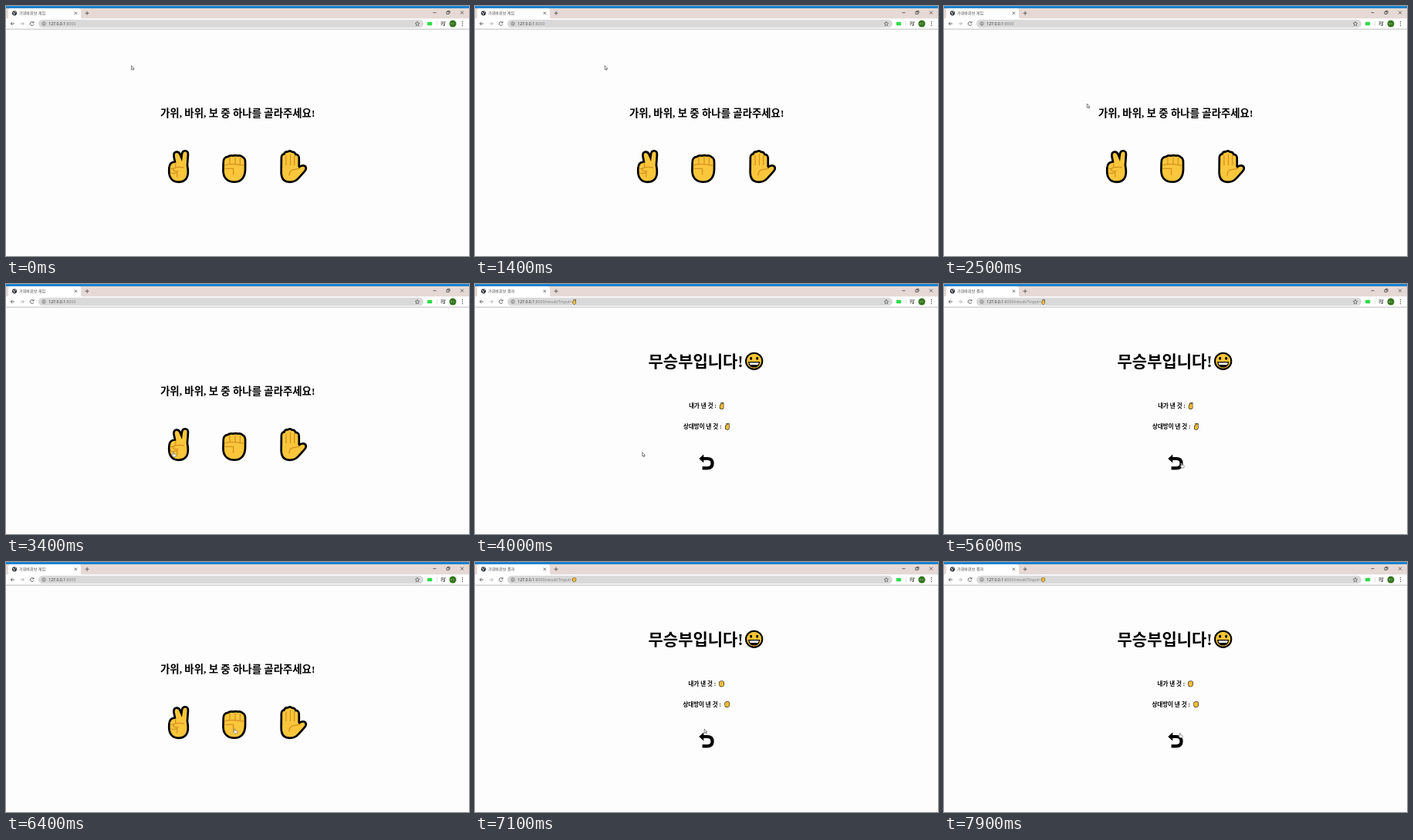
An HTML page for the animation above (8 s loop, 600x325 px).

```html
<!DOCTYPE html>
<html lang="ko">
<head>
<meta charset="utf-8">
<title>가위바위보 게임</title>
<style>
  html, body { margin: 0; width: 100%; height: 100%; overflow: hidden; background: #fefdfe; }
  svg { display: block; width: 600px; height: 325px; }
  .ui { font: 5.1px "Noto Sans CJK KR", "Noto Sans CJK", sans-serif; fill: #4a4646; }
  .url { font: 5.2px "Open Sans", sans-serif; fill: #7b7b7b; }
  .page { font-family: "Liberation Serif", "Noto Sans CJK KR", "Noto Sans CJK", serif; font-weight: bold; fill: #000; }
  .line { fill: none; stroke: #555; stroke-width: .9; }
  .skin { fill: #f9c63c; stroke: #000; stroke-width: 5.4; stroke-linejoin: round; paint-order: stroke; }
  .crease { fill: none; stroke: #d6921f; stroke-width: 1.3; stroke-linecap: round; stroke-linejoin: round; }
</style>
</head>
<body>
<svg viewBox="0 0 600 325">
  <defs>
    <!-- Hands are centred on 0,0 so they can be reused at any size -->
    <g id="scissors" transform="translate(-223.5 -208.5)">
      <path class="skin" d="M220.5 203.5 218.8 195Q218.5 191.3 221 191 223.3 190.8 224.4 193.5L228 202 229.3 192.5Q229.8 189.6 232.3 189.6 234.8 190 234.6 193L233.6 207Q234.6 212 234.5 216C234.5 224 230 227.5 223.5 227.5 216 227.5 212.6 222 212.6 215Q212.2 206 216 204.6Z"/>
      <path class="crease" d="M219.7 205V209.5M214 211.5H217M230 210Q224 208.7 219 210.2 215.5 212 217.5 214 219 215.5 223 214.6M214 217Q217 218.5 221.8 216.4V222"/>
    </g>
    <g id="rock" transform="translate(-296 -211.5)">
      <path class="skin" d="M283 204Q282.6 197.5 288 197.3 290.5 195 294 196 297.5 194.8 301 196 304 195.3 306 197.5 309 198.5 308.7 204V212C308.7 222 304 227.4 296 227.4 287 227.4 282.8 222 282.8 214Z"/>
      <path class="crease" d="M290 197.5V205.5M297 197V205.5M303.4 197.5V205.5M283.3 207Q288 205.3 296 205.6L308 207.2M284 211.3H294.6V219"/>
    </g>
    <g id="paper" transform="translate(-372.5 -208.5)">
      <path class="skin" d="M358.2 197Q358.3 193.5 361.5 193.8 362 190.4 365.5 190.8 368 188.8 370 191 373.8 190.7 374.3 194.3 378.2 194 378.4 197.6V209L380 211Q384.2 207.5 387 209.5 388.2 211.5 386 214L378 223Q374 227.5 368 227.5C361 227.5 358 223 358 216Z"/>
      <path class="crease" d="M363 195V206.5M368.5 193V206.5M373.6 195V206.5M367 220Q367 213.5 373 212.6L380 211.4"/>
    </g>
  </defs>

  <rect width="600" height="325" fill="#fefdfe"/>
  <g id="browser">
    <rect width="600" height="16.5" fill="#e6d9d5"/>
    <rect width="600" height="3" fill="#1c82cf"/>
    <path d="M0 16.5Q3 16.5 3 14V5.5Q3 3 5.5 3H94.5Q97 3 97 5.5V14Q97 16.5 100 16.5H600V30H0Z" fill="#fff"/>
    <rect y="29.6" width="600" height="1" fill="#bdbdbd"/>
    <circle cx="11" cy="9.3" r="3.1" fill="#33363a"/>
    <path d="M9 8.2 11 9.4 10.3 11.4M11.5 7 13 8.4" fill="none" stroke="#fff" stroke-width=".9"/>
    <text id="tab" class="ui" x="17" y="11.2"></text>
    <path class="line" d="M88.7 7.6l3.4 3.4m0-3.4-3.4 3.4M102.6 9.3h5m-2.5-2.5v5M553.5 8.7h4M571 7.5h3v3h-3zM572.2 7.4V6.4h2.9v2.9h-1M589 6.6l4 4m0-4-4 4"/>
    <path class="line" d="M11 23H6.2m2.2-2.2L6.2 23l2.2 2.2"/>
    <path class="line" stroke-opacity=".45" d="M18.5 23h4.8m-2.2-2.2 2.2 2.2-2.2 2.2"/>
    <path class="line" d="M35.5 21.4a2.4 2.4 0 1 0 .4 2.4M36 20.2v1.7h-1.8"/>
    <rect x="42" y="17.8" width="499" height="10.4" rx="5.2" fill="#d9d9d9"/>
    <circle cx="49" cy="23" r="2.3" fill="none" stroke="#666" stroke-width=".7"/>
    <path class="line" d="M49 22.7v1.6m0-2.7v.6" stroke-width=".7"/>
    <text class="url" x="55.2" y="25"><tspan fill="#2b2b2b">127.0.0.1</tspan><tspan id="path"></tspan></text>
    <use id="urlHand"/>
    <path class="line" style="stroke-width:.7" d="M533 20.2l.8 1.9 2 .2-1.5 1.4.4 2-1.7-1-1.7 1 .4-2-1.5-1.4 2-.2z"/>
    <rect x="546" y="20.8" width="6.2" height="4.4" rx=".8" fill="#2fdc49"/>
    <path d="M558.5 19.5v7" stroke="#ccc" stroke-width=".6"/>
    <path class="line" d="M563.5 20.8h4M563.5 22.6h4M563.5 24.4h2M568.3 25v-4.2h1.5"/>
    <circle cx="567.5" cy="25" r="1" fill="#555"/>
    <circle cx="579" cy="23" r="4.5" fill="#32731d"/>
    <path d="M576.4 22.2h1.5v1.6h-1.5zM579.2 22.2h1.8m-1.8 1.5h1.8" fill="none" stroke="#8db87c" stroke-width=".6"/>
    <g fill="#555"><circle cx="591.5" cy="20.6" r=".75"/><circle cx="591.5" cy="23" r=".75"/><circle cx="591.5" cy="25.4" r=".75"/></g>
  </g>

  <g id="game" class="page">
    <text x="200" y="143.6" font-size="13.4">가위, 바위, 보 중 하나를 골라주세요!</text>
    <use href="#scissors" x="223.5" y="208.5"/>
    <use href="#rock" x="296" y="211.5"/>
    <use href="#paper" x="372.5" y="208.5"/>
  </g>

  <g id="result" class="page">
    <text x="224.5" y="107.6" font-size="21">무승부입니다!</text>
    <circle cx="361.7" cy="100.3" r="10.6" fill="#fbc437" stroke="#000" stroke-width="2.1"/>
    <ellipse cx="357.7" cy="96.8" rx="1.5" ry="2"/>
    <ellipse cx="365.7" cy="96.8" rx="1.5" ry="2"/>
    <path d="M354.8 101.6H368.6Q367.8 108 361.7 108 355.6 108 354.8 101.6Z" fill="#fff" stroke="#000" stroke-width="1.2"/>
    <path d="M356 105H367.4Q365.5 108 361.7 108 357.9 108 356 105Z"/>
    <g font-size="7.5">
      <text id="mine" y="161">내가 낸 것 :</text>
      <text id="theirs" y="187.8">상대방이 낸 것 :</text>
    </g>
    <use id="mineHand"/>
    <use id="theirsHand"/>
    <path d="M290.3 227 296.3 221.6V232.4Z"/>
    <path d="M295.5 227H301Q307.6 227 307.6 233.2 307.6 239.4 301 239.4H294.6" fill="none" stroke="#000" stroke-width="4.2"/>
  </g>

  <g id="cursor" stroke-linejoin="round">
    <path id="pointer" d="M0 0V5.2L1.2 4.2 2.1 6 2.9 5.6 2.1 3.9H3.7Z" fill="#fff" stroke="#444" stroke-width=".65"/>
    <path id="hand" d="M-.6.4Q0-.4.6.4V2.4L2.9 2.9Q3.7 3.2 3.5 4.2L3 6.3H.2L-1.7 3.9Q-1.6 3-.6 3.8Z" fill="#fff" stroke="#555" stroke-width=".55"/>
  </g>
</svg>
<script>
const LOOP = 8000, STEP = 100;
const $ = id => document.getElementById(id);

// Pages by start time; hand names the choice shown on a result page
const pages = [
  { at: 0 },
  { at: 3700, hand: 'scissors' },
  { at: 5900 },
  { at: 6800, hand: 'rock' }
];

// Pointer tip: time, x, y
const track = [
  [0, 162.5, 77.5], [900, 162.5, 77.5], [1400, 168.2, 77.5], [2100, 168.2, 77.5],
  [3100, 216.8, 218.3], [3700, 216.8, 218.8], [4400, 216.8, 218.8], [5300, 307.8, 232.8],
  [5950, 307.8, 232.8], [6300, 296.2, 216.6], [7000, 296.2, 216.6], [7500, 305.8, 222.3], [LOOP, 305.8, 222.3]
];

const ease = p => p * p * (3 - 2 * p);
const show = (id, on) => $(id).style.display = on ? '' : 'none';

function pointerAt(t) {
  const i = track.findIndex((k, n) => n && t < k[0]);
  const [t0, x0, y0] = track[i - 1], [t1, x1, y1] = track[i];
  const p = ease((t - t0) / (t1 - t0));
  return [x0 + (x1 - x0) * p, y0 + (y1 - y0) * p];
}

function place(id, hand, x, y, size) {
  $(id).setAttribute('href', '#' + hand);
  $(id).setAttribute('transform', `translate(${x} ${y}) scale(${size})`);
}

function openPage({ hand }) {
  show('game', !hand);
  show('result', hand);
  show('urlHand', hand);
  $('tab').textContent = hand ? '가위바위보 결과' : '가위바위보 게임';
  $('path').textContent = hand ? ':8000/result/?input=' : ':8000';
  if (!hand) return;
  const shift = hand === 'rock' ? -.6 : 0;
  $('mine').setAttribute('x', 277.2 + shift);
  $('theirs').setAttribute('x', 270 + shift);
  place('mineHand', hand, 319.6, 158.4, .21);
  place('theirsHand', hand, 326.8, 185.2, .21);
  place('urlHand', hand, 128.6, 23.1, .16);
}

function overLink(x, y, page) {
  if (page.hand) return x > 290 && x < 310 && y > 221 && y < 242;
  return y > 187 && y < 231 && [[210, 238], [280, 312], [355, 390]].some(([a, b]) => x > a && x < b);
}

let current;
function draw(now) {
  const t = Math.floor(now % LOOP / STEP) * STEP;
  const page = pages.filter(p => p.at <= t).pop();
  if (page !== current) openPage(current = page);
  const [x, y] = pointerAt(t);
  const link = overLink(x, y, page);
  $('cursor').setAttribute('transform', `translate(${x} ${y})`);
  show('hand', link);
  show('pointer', !link);
}

const start = performance.now();
function tick() {
  draw(performance.now() - start);
  requestAnimationFrame(tick);
}
tick();
</script>
</body>
</html>
```
